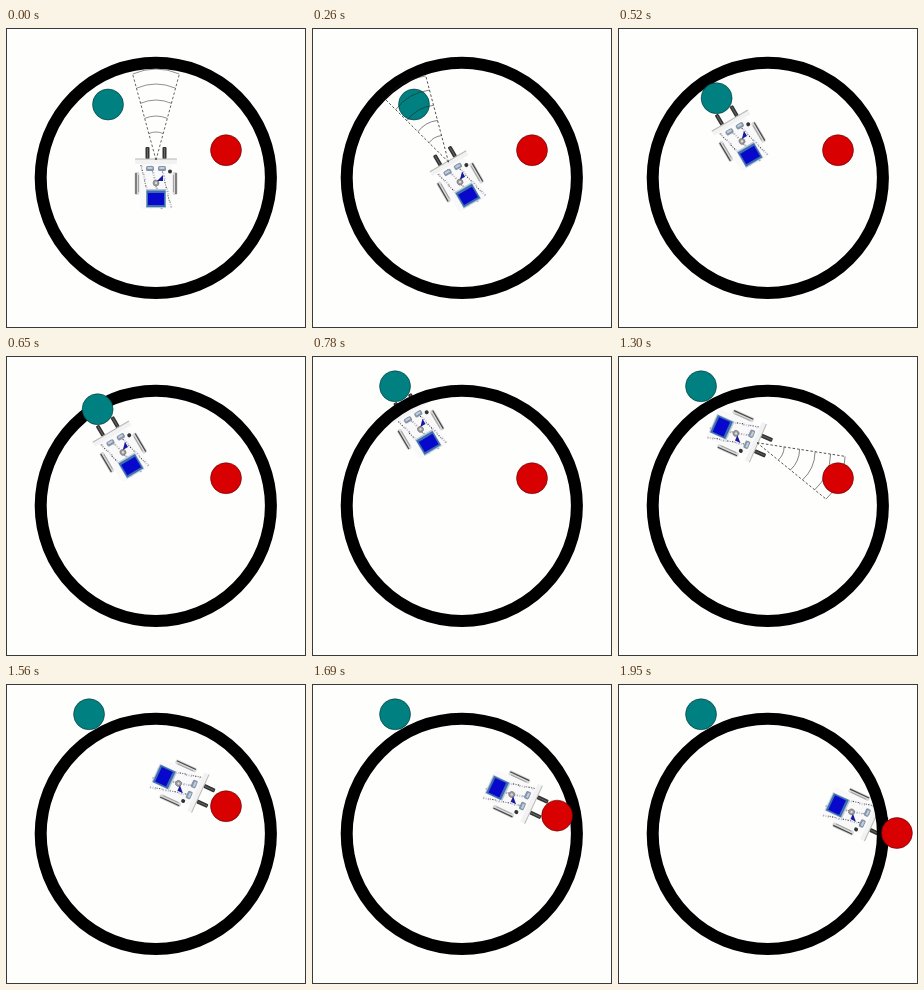
These frames come from a looping animation (300x300 px, 2.08 s). An HTML page with a canvas:

```html
<!DOCTYPE html>
<html>
<head>
<meta charset="utf-8">
<style>
html, body { margin: 0; width: 300px; height: 300px; overflow: hidden; background: #fefefd; }
canvas { display: block; }
</style>
</head>
<body>
<canvas id="stage" width="300" height="300"></canvas>
<script>
const ctx = document.getElementById('stage').getContext('2d');
const STEP = 130, REACH = 50, TAU = Math.PI * 2;

// Robot keyed poses: step, x, y, heading in degrees (clockwise from up)
const keys = [
  [0, 150, 155, 0], [1, 150, 155, 32], [2, 148, 154, -30], [4, 124, 113.3, -30.5],
  [5, 117, 96.3, -30.5], [6, 108.5, 73.3, -30.6], [10, 118, 77.4, 114],
  [13, 199.8, 110.5, 115], [15, 233.6, 127.9, 115]
];
const scanning = [0, 1, 2, 7, 8, 9, 10];

function poseAt(step) {
  const i = Math.max(1, keys.findIndex(k => k[0] >= step));
  const a = keys[i - 1], b = keys[i];
  const f = (step - a[0]) / (b[0] - a[0]);
  const [x, y, deg] = [1, 2, 3].map(n => a[n] + (b[n] - a[n]) * f);
  return { x, y, angle: deg * Math.PI / 180 };
}

// A ball rests at home, is pushed from first to last, then stays put
function ballAt(step, first, last, home) {
  if (step < first) return home;
  const p = poseAt(Math.min(step, last));
  return [p.x + REACH * Math.sin(p.angle), p.y - REACH * Math.cos(p.angle)];
}

function rect(color, x, y, w, h, r = 0) {
  ctx.fillStyle = color;
  ctx.beginPath();
  ctx.roundRect(x, y, w, h, r);
  ctx.fill();
}

function disc(color, x, y, r, edge) {
  ctx.beginPath();
  ctx.arc(x, y, r, 0, TAU);
  ctx.fillStyle = color;
  ctx.fill();
  if (edge) {
    ctx.strokeStyle = edge;
    ctx.lineWidth = 0.5;
    ctx.stroke();
  }
}

function inRobotSpace(pose, draw) {
  ctx.save();
  ctx.translate(pose.x, pose.y);
  ctx.rotate(pose.angle);
  draw();
  ctx.restore();
}

function robot() {
  for (const side of [-1, 1]) {
    rect('#333', side * 8.5 - 2, -36, 4, 12, 1);
    rect('#666', side * 8.5 - 0.5, -35, 1, 10);
    rect('#d8d8d8', side * 19 - 2.5, -11, 5, 23, 2);
    rect('#444', side * 20 - 0.6, -10, 1.2, 21);
    rect('#999', side * 17.5 - 0.4, -8, 0.8, 17);
  }
  rect('#f2f2f2', -21, -24, 42, 5, 1);
  rect('#b8b8b8', -21, -24.5, 42, 1);
  rect('#f9f9f9', -16, -19, 32, 45, 4);

  // Board components
  for (let i = 0; i < 60; i++) {
    const x = (i * 11.7) % 30 - 15.5, y = (i * 7.3) % 43 - 18;
    rect(['#333', '#aab', '#777', '#ccd'][i % 4], x, y, 1 + i % 2, 1.2);
  }
  for (const side of [-1, 1]) {
    rect('#8495aa', side * 6 - 4, -17, 8, 5, 1.5);
    rect('#c5ced8', side * 6 - 2.5, -16, 5, 2);
  }
  disc('#333', 14, -11.5, 2);
  disc('#999', 0, 0, 3, '#666');
  disc('#ddd', 0, 0, 1.2);
  ctx.fillStyle = '#1818a0';
  ctx.beginPath();
  ctx.moveTo(1, -2);
  ctx.lineTo(7, -8);
  ctx.lineTo(7, -2);
  ctx.fill();

  rect('#b9c6d8', -10, 6, 20, 19);
  rect('#3d6fae', -9.5, 7.5, 19, 16.5);
  rect('#0808cc', -8, 10, 16, 12);
}

function cone() {
  const width = 0.257, shoulder = 0.945, length = 91;
  ctx.translate(0, -23);
  ctx.strokeStyle = '#222';
  ctx.lineWidth = 0.5;
  for (const r of [28, 44, 60, 76, length]) {
    ctx.beginPath();
    ctx.moveTo(-r * width, -r * shoulder);
    ctx.quadraticCurveTo(0, -r * (2 - shoulder), r * width, -r * shoulder);
    ctx.stroke();
  }
  ctx.setLineDash([2.5, 2]);
  ctx.lineWidth = 0.7;
  for (const side of [-1, 1]) {
    ctx.beginPath();
    ctx.moveTo(0, 0);
    ctx.lineTo(side * length * width, -length * shoulder);
    ctx.stroke();
  }
}

function render(time) {
  const step = Math.floor(time / STEP) % 16;
  const pose = poseAt(step);
  ctx.fillStyle = '#fefefd';
  ctx.fillRect(0, 0, 300, 300);

  inRobotSpace(pose, robot);

  ctx.strokeStyle = '#000';
  ctx.lineWidth = 12;
  ctx.beginPath();
  ctx.arc(149.8, 149.8, 115.1, 0, TAU);
  ctx.stroke();

  disc('#008080', ...ballAt(step, 4, 6, [102, 76.5]), 15.5, '#022');
  if (scanning.includes(step)) inRobotSpace(pose, cone);
  disc('#d80000', ...ballAt(step, 13, 15, [220, 122.2]), 15.5, '#400');

  ctx.strokeStyle = '#3a3a3a';
  ctx.lineWidth = 1;
  ctx.strokeRect(0.5, 0.5, 299, 299);
}

const start = performance.now();
function tick() {
  render(performance.now() - start);
  requestAnimationFrame(tick);
}
tick();
</script>
</body>
</html>
```
